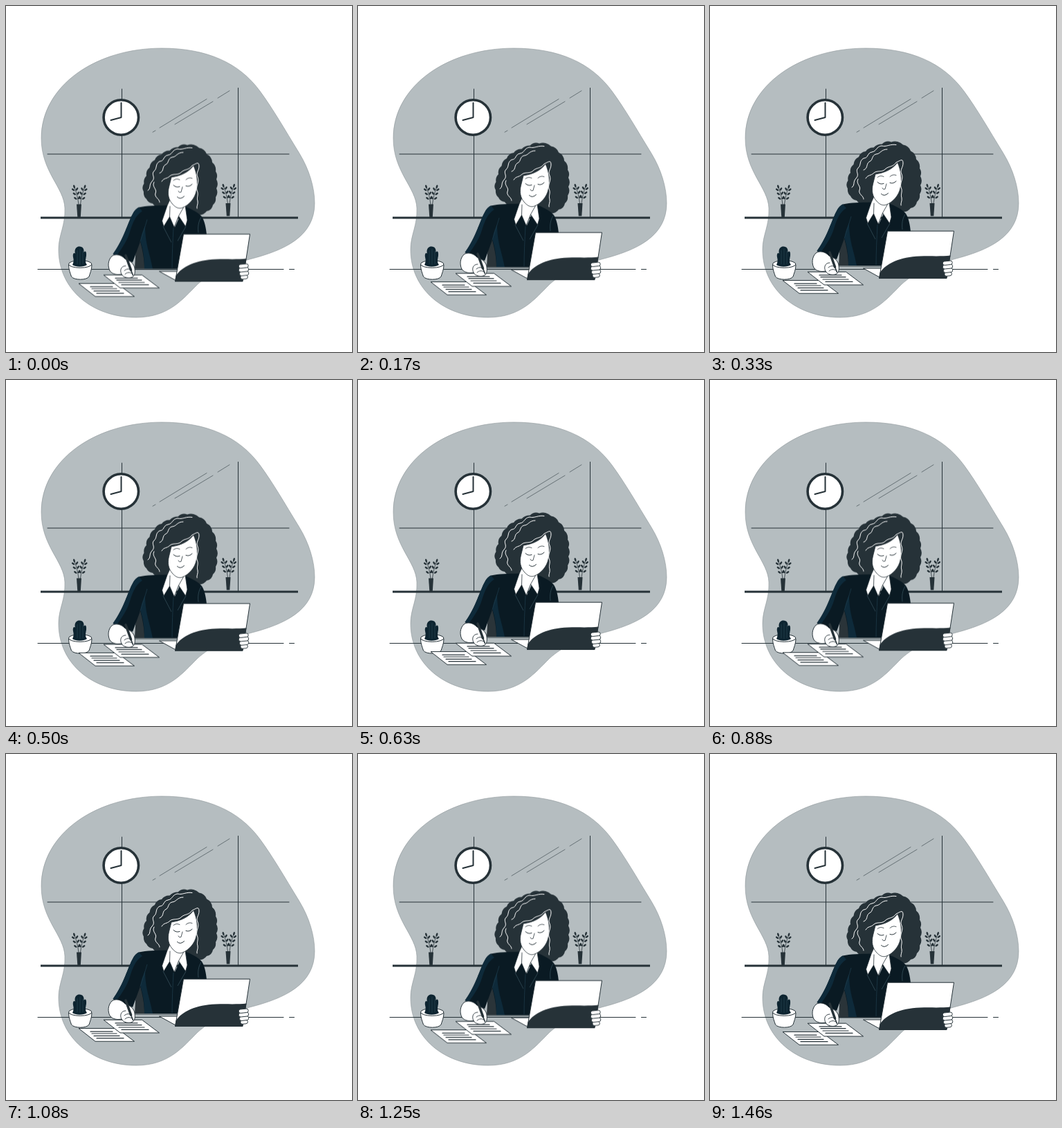
These frames come from a looping animation (500 by 500 pixels, 1.5 s). An HTML page:

```html
<!DOCTYPE html>
<html lang="en">
<head>
<meta charset="utf-8">
<title>At the desk</title>
<style>
  html, body { margin: 0; width: 100%; height: 100%; overflow: hidden; background: #fff; }
  svg { display: block; width: 100vw; height: 100vh; }
  .line { fill: none; stroke: #263238; stroke-linecap: round; stroke-linejoin: round; }
  .paper { fill: #fff; stroke: #263238; stroke-linejoin: round; }
  .dark { fill: #263238; }
  .strand { fill: none; stroke: #fff; stroke-width: 1; stroke-linecap: round; stroke-linejoin: round; }
  #float { animation: float 1.5s linear -40ms infinite; }
  @keyframes float {
    50% { transform: translateY(-10px); }
  }
</style>
</head>
<body>
<svg viewBox="0 0 500 500">
  <defs>
    <g id="pair">
      <ellipse cx="-2.700" cy="-1" rx="2.500" ry="1.300" transform="rotate(35 -2.700 -1)"/>
      <ellipse cx="2.700" cy="-2" rx="2.500" ry="1.300" transform="rotate(-55 2.700 -2)"/>
    </g>
    <g id="stem">
      <path class="line" stroke-width=".8" d="M105 287C104 278 102 270 99 262"/>
      <g class="dark">
        <ellipse cx="98.500" cy="261" rx="1.300" ry="2.500" transform="rotate(-18 98.500 261)"/>
        <use href="#pair" x="99.800" y="266.500"/>
        <use href="#pair" x="101.500" y="272.500"/>
        <use href="#pair" x="103" y="279"/>
      </g>
    </g>
    <g id="sprig">
      <use href="#stem"/>
      <use href="#stem" transform="matrix(-1 0 0 1 212.500 0)"/>
      <path class="dark" d="M102 286.500H109L107.800 305H103.300Z"/>
    </g>
    <g id="sheet">
      <path class="paper" d="M105 401.500H160.500L185.500 420.300H129Z"/>
      <path class="line" stroke-width="1.200" d="M122 406.200H154M124 409H160M127 412.300H164M131 415.700H170"/>
    </g>
  </defs>

  <!-- room -->
  <path fill="#b5bdc0" stroke="#8d9699" stroke-width=".6" d="M51 191C51 115 130 61 225 61C290 61 337 82 367 123C386 149 402 177 424 213C438 236 446 262 446 285C446 333 403 353 352 366C310 378 296 386 277 402C255 424 235 450 188 450C125 450 76 410 76 352C76 330 86 318 85 292C84 262 51 240 51 191Z"/>
  <path class="line" d="M60 214H409M167.500 120V305M335.500 118.500V305"/>
  <path class="line" stroke-width=".55" d="M222 176L290 134.500M244 171L299 138M306 133L323 122.500M212 182.300L216 180"/>
  <path class="line" style="stroke-linecap:butt" stroke-width="3" d="M50 306H422"/>
  <circle class="paper" cx="166.300" cy="161" r="25.200" stroke-width="3.600"/>
  <path class="line" stroke-width="2" d="M166.500 140V161L151.500 165"/>
  <use href="#sprig"/>
  <use href="#sprig" x="215.500" y="-1.500"/>
  <path class="line" d="M46 380.500H401M409.500 380.500H416.500"/>

  <!-- cactus -->
  <path class="paper" d="M90.500 374C90.500 381 93 386 94.500 391C98 396.500 117 396.500 120 391C121.500 386 124 381 124 374Z"/>
  <ellipse class="paper" cx="107.200" cy="373" rx="16.700" ry="5.300"/>
  <path fill="#0d2430" d="M96 374C98 370 98 367 97 363C96 357 99 356 100 358C98 350 103 347.500 106 347.500C111 347.500 113 351 112.500 356C115 353 116.500 355 116 361C115 367 114 370 117 374C112 377.500 101 377.500 96 374Z"/>
  <path fill="none" stroke="#35505d" stroke-width=".5" d="M103 353V373M107 351V374M111 354V373"/>

  <g id="float">
    <!-- hair -->
    <path class="dark" d="M262 201.500A16 16 0 0 1 279 205.500A14 14 0 0 1 290 214.500A14 14 0 0 1 298 226.500A14 14 0 0 1 303 239.500A12 12 0 0 1 304 251A13 13 0 0 1 304 264A13 13 0 0 1 303 277A12 12 0 0 1 299 288A11 11 0 0 1 290 297A14 14 0 0 1 277 302.500L236 292A14 14 0 0 1 223 291.500A12 12 0 0 1 212 286A11 11 0 0 1 203 279.500A12 12 0 0 1 199 269A11 11 0 0 1 199.500 257A12 12 0 0 1 203 246A12 12 0 0 1 207.500 234A13 13 0 0 1 215 223A12 12 0 0 1 225 215A13 13 0 0 1 236.500 209.500A16 16 0 0 1 248.500 204.500A13 13 0 0 1 262 201.500Z"/>
    <path class="strand" d="M269 205.500C260 204 255 209 248 207C240 208 241 215 234 216C227 217 229 225 222 225C215 229 219 235 214 239C209 244 217 248 211 254C206 259 210 264 205 267M256 212C247 212 246 219 240 219C233 221 236 228 230 230C225 234 229 239 222 242"/>
    <path class="strand" stroke-width=".8" d="M214 255C210 262 219 265 216 271C214 277 222 279 222 284"/>

    <!-- blazer -->
    <path fill="#2a3439" d="M188 344L200 338V380H186Z"/>
    <path fill="#0a1a23" d="M233 288.500C217 289 203 289 192 291.500C183 295 179 311 171 329C165 343 160 351 154.500 359L183 371C187 360 190 352 194 341C198 356 200 368 200 380H255L290 331C289 321 287 311 283 305C277 298 268 294 258 290L244 320Z"/>
    <path fill="#0e2a3a" d="M192 291.500C183 295 179 311 171 329C165 343 160 351 154.500 359L160 361C168 350 175 340 179 327C183 314 187 303 197 297ZM201 318C195 332 194 338 195 343C199 356 200 368 200 380H212C208 358 201 345 201 318Z"/>
    <path fill="none" stroke="#1d3a49" stroke-width=".8" d="M204 309C201 320 197 331 194 341M242 321C241 340 240 361 240 379"/>
    <path fill="none" stroke="#44606c" stroke-width=".6" d="M227 319L239 342M260 319L248 340M282 306C278 312 277 320 278 328"/>

    <!-- neck and collar -->
    <path class="paper" stroke-width=".8" d="M237 280L233 289L225.500 311L228 319L236.500 305L243 320L249.500 304L259.500 319L262 310L259 289V276Z"/>
    <path class="line" stroke-width=".8" d="M236.500 305L237 290M249.500 304L258 289"/>

    <!-- face -->
    <path class="paper" stroke-width=".8" d="M271 231C264 241 252 246 239 248L235.500 262C233 272 235 280 240 286C245 292 250 294 255 292C265 288 273 278 275 268C278 255 276 243 271 231Z"/>
    <path class="strand" d="M225 254C229 248 232 251 237 246C242 242 249 246 254 240C259 236 264 238 269 231C274 229 279 224 279 232C279 239 274 241 277 248C280 255 274 260 276 267C279 273 275 277 277 282C278 287 275 290 276 293"/>
    <path class="line" d="M242 259.500Q246 263.500 251 261.500M260 260.500Q265 262.500 269 258M247.500 276.500Q252 281 257.500 275.500"/>
    <path class="line" stroke-width=".8" d="M242 252.500Q246 249 251 251.500M260 251.500Q264 247.500 269 249.500M255 262L253 269.500Q250 271 249 268"/>

    <!-- desk edge and sheets -->
    <path class="line" d="M186 381H247"/>
    <path class="paper" d="M221.500 384H249L247 398Z"/>
    <use href="#sheet"/>
    <use href="#sheet" x="36" y="-12.300"/>

    <!-- writing hand -->
    <path class="paper" d="M153 362C147 368 147 377 150 383C154 389 162 389 167 388C169 393 178 395 183 392C187 390 187 382 185 376C182 370 177 368 172 366C167 360 158 358 153 362Z"/>
    <path class="line" stroke-width=".9" d="M167 388C164 383 166 376 173 376M171 383C174 380 178 380 181 382M172 388C175 385 179 385 182 387"/>
    <path class="line" stroke-width="3.600" d="M173 361L180.500 382"/>
    <path class="line" stroke-width="1.600" d="M180.500 382L183.500 389.500"/>

    <!-- laptop -->
    <path class="paper" d="M256.500 330.200H352.500L342 398.500H244.500Z"/>
    <path class="dark" d="M245.500 390.500C254 377 275 367.500 303 366.500C320 366 335 367 347.500 365.500L342 399H244Z"/>

    <!-- holding hand -->
    <g class="paper" stroke-width=".9" transform="rotate(-6 344 384)">
      <rect x="338" y="389.500" width="10.500" height="5.500" rx="2.700"/>
      <rect x="337" y="384" width="13.500" height="6" rx="3"/>
      <rect x="336.500" y="378.500" width="14.500" height="6" rx="3"/>
      <rect x="337" y="373.500" width="14" height="5.500" rx="2.700"/>
    </g>
  </g>
</svg>
</body>
</html>
```
